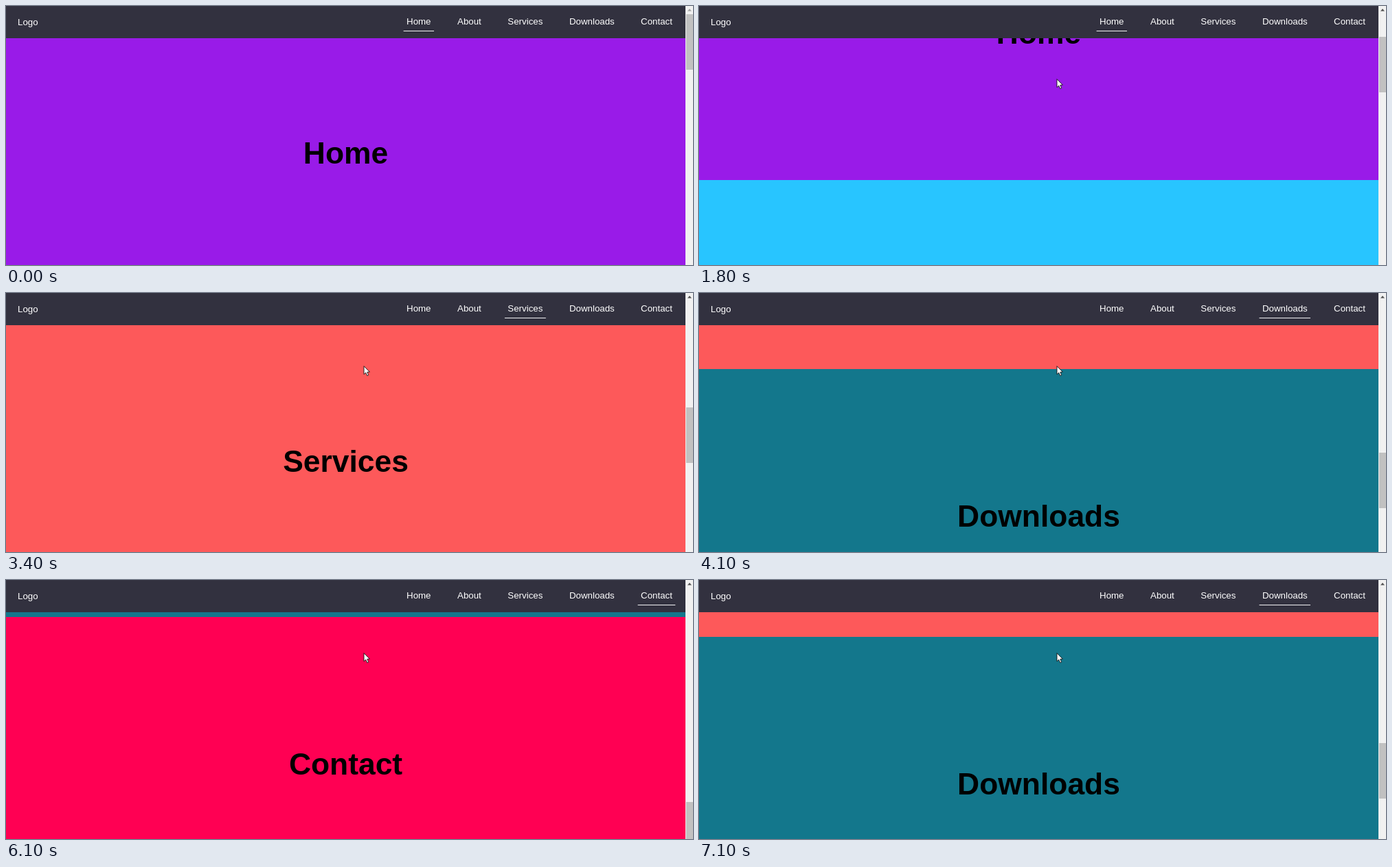
An HTML page with a canvas that plays this animation: 1000 px wide and 378 px high, repeating every 7.2 s.

```html
<!DOCTYPE html>
<html lang="en">
<head>
<meta charset="utf-8">
<title>Scroll navigation</title>
<style>
html, body { margin: 0; width: 100%; height: 100%; overflow: hidden; }
canvas { display: block; }
</style>
</head>
<body>
<canvas id="stage" width="1000" height="378"></canvas>
<script>
const ctx = document.getElementById('stage').getContext('2d');
const LOOP = 7200, STEP = 100;
const WIDTH = 1000, HEIGHT = 378, PAGE_WIDTH = 989;
const HEADER = 47, SECTION = 429;
const FONT = '"Liberation Sans", Arial, sans-serif';

// x is the left edge of the link's underline
const sections = [
  { name: 'Home', color: '#991be8', x: 578.6, width: 44.4 },
  { name: 'About', color: '#28c5ff', x: 652.6, width: 43.6 },
  { name: 'Services', color: '#fd595a', x: 725.9, width: 59.9 },
  { name: 'Downloads', color: '#13778c', x: 815.5, width: 74.5 },
  { name: 'Contact', color: '#ff0053', x: 919.6, width: 54.7 }
];

// [time in ms, page offset in px]
const scrollKeys = [
  [0, 0], [1200, 0], [1400, 35], [1800, 175], [2600, 497],
  [2900, 700], [3100, 804], [3300, 804], [3500, 850], [4100, 1176],
  [4300, 1305], [4500, 1370], [4700, 1370], [4800, 1410], [5000, 1603],
  [5300, 1716], [5800, 1716], [6100, 1662], [6900, 1250], [7100, 1204]
];

function scrollAt(t) {
  const i = scrollKeys.findIndex(([time]) => time >= t);
  if (i < 0) return scrollKeys[scrollKeys.length - 1][1];
  if (i === 0) return scrollKeys[0][1];
  const [t0, y0] = scrollKeys[i - 1], [t1, y1] = scrollKeys[i];
  return Math.round(y0 + (y1 - y0) * (t - t0) / (t1 - t0));
}

function rect(color, x, y, w, h) {
  ctx.fillStyle = color;
  ctx.fillRect(x, y, w, h);
}

function text(string, x, y, color, font, align = 'left') {
  ctx.fillStyle = color;
  ctx.font = `${font} ${FONT}`;
  ctx.textAlign = align;
  ctx.fillText(string, x, y);
}

function polygon(points) {
  ctx.beginPath();
  points.forEach(([x, y]) => ctx.lineTo(x, y));
  ctx.closePath();
}

function drawSections(scroll) {
  sections.forEach(({ name, color }, i) => {
    const top = i * SECTION - scroll;
    if (top > HEIGHT || top + SECTION < 0) return;
    rect(color, 0, top, PAGE_WIDTH, SECTION);
    text(name, PAGE_WIDTH / 2, top + 230, '#000', 'bold 44.4px', 'center');
  });
}

function drawHeader(scroll) {
  rect('#32313f', 0, 0, PAGE_WIDTH, HEADER);
  text('Logo', 17, 27.8, '#fff', '13.3px');
  const active = Math.floor((scroll + 112) / SECTION);
  sections.forEach(({ name, x, width }, i) => {
    text(name, x + 4.45, 27, '#fff', '13.3px');
    if (i === active) rect('#f4f4f6', x, 36, width, 1);
  });
}

function drawScrollbar(scroll) {
  rect('#f1f1f1', PAGE_WIDTH, 0, WIDTH - PAGE_WIDTH, HEIGHT);
  rect('#c1c1c1', 990, Math.round(11.8 + scroll * 0.188), 10, 81);
  polygon([[992, 7.5], [995, 4], [998, 7.5]]);
  ctx.fillStyle = scroll ? '#505050' : '#a3a3a3';
  ctx.fill();
}

function drawCursor(t) {
  if (t < 800) return;
  const left = Math.max(0, 1 - (t - 700) / 400);
  ctx.save();
  ctx.translate(521, 106.7 + 290 * left * left);
  polygon([[0, 0], [0, 12], [2.7, 9.5], [4.7, 14], [6.7, 13.1], [4.8, 8.7], [8.4, 8.5]]);
  ctx.fillStyle = '#fff';
  ctx.fill();
  ctx.strokeStyle = '#111';
  ctx.lineWidth = 0.9;
  ctx.stroke();
  ctx.restore();
}

function draw(now) {
  const t = Math.floor((now % LOOP) / STEP) * STEP;
  const scroll = scrollAt(t);
  drawSections(scroll);
  drawHeader(scroll);
  drawScrollbar(scroll);
  drawCursor(t);
}

let start;
function tick(now) {
  start ??= now;
  draw(Math.max(0, now - start));
  requestAnimationFrame(tick);
}
draw(0);
requestAnimationFrame(tick);
</script>
</body>
</html>
```
